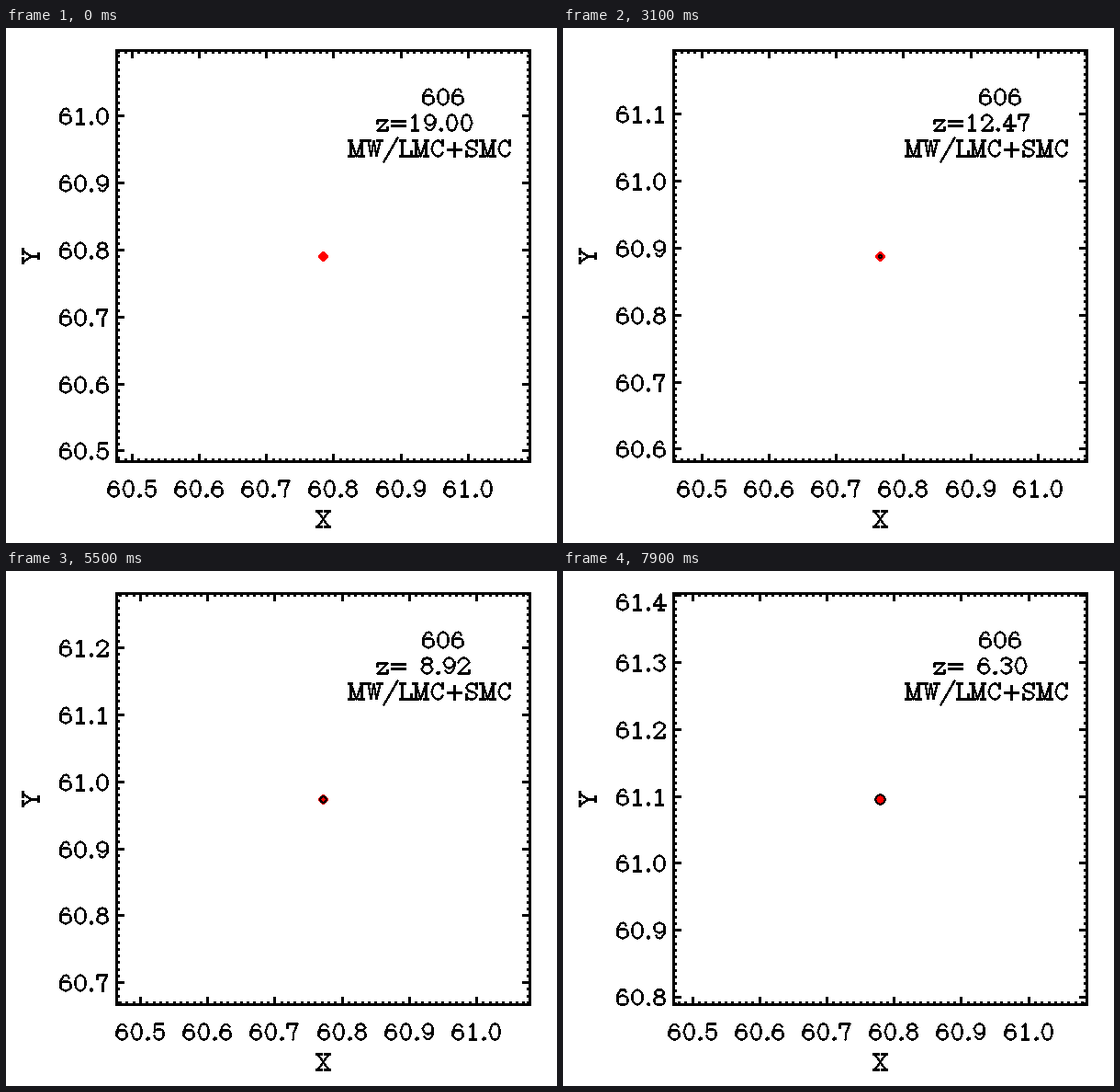
Animation of 600x560 px, one loop 8 s. Source, as a matplotlib script:

```python
import numpy as np
import matplotlib.pyplot as plt
from matplotlib.animation import FuncAnimation
from matplotlib.collections import LineCollection
from matplotlib.patches import Polygon

W, H, DPI = 600, 560, 100
FRAMES, INTERVAL = 80, 100
PX = 72 / DPI                                 # one pixel in points
LEFT, RIGHT, TOP, BOTTOM = 120.5, 570.5, 24.5, 471.5
CX, CY = 346, 248                             # middle of the plot
SX, SY = 732, 728                             # pixels per data unit
SCALE = 0.8                                   # pixels per glyph unit

# ---- stroke font: y grows upward from the baseline, capitals are 21 high ----
FONT = {" ": (16, [])}


def line(*xy):
    return np.array(xy, float).reshape(-1, 2)


def bowl(cy, ry, a0=0, a1=360, rx=7, cx=10):
    a = np.radians(np.linspace(a0, a1, max(4, int(abs(a1 - a0) / 20) + 1)))
    return np.column_stack([cx + rx * np.cos(a), cy + ry * np.sin(a)])


def serif(y, *xs, half=3):
    return [line(x - half, y, x + half, y) for x in xs]


def glyph(char, width, *strokes):
    FONT[char] = (width, list(strokes))


glyph("0", 20, bowl(10.5, 10.5))
glyph("1", 20, line(6, 17, 10, 21, 10, 0), *serif(0, 10, half=4))
glyph("2", 20, bowl(15.5, 5.5, 180, -40), line(15.4, 12, 3, 0, 17, 0, 17, 4))
glyph("3", 20, bowl(16.5, 4.5, 160, -90), bowl(6, 6, 90, -160))
glyph("4", 20, line(12, 0, 12, 21, 2, 6, 18, 6), *serif(0, 12))
glyph("5", 20, line(15, 21, 5, 21, 3.9, 10.5), bowl(7, 7, 150, -160))
glyph("6", 20, bowl(6.5, 6.5), bowl(10, 11, 45, 180), line(3, 10, 3, 6.5))
glyph("7", 20, line(3, 16, 3, 21, 17, 21, 11, 10, 10, 0))
glyph("8", 20, bowl(16.5, 4.5, rx=6), bowl(6, 6))
glyph("9", 20, *[np.array([20, 21]) - s for s in FONT["6"][1]])
glyph(".", 10, bowl(1, 1, rx=1, cx=5))
glyph("=", 26, *serif(12, 13, half=9), *serif(6, 13, half=9))
glyph("+", 26, line(13, 18, 13, 0), *serif(9, 13, half=9))
glyph("/", 22, line(20, 25, 2, -7))
glyph("M", 24, line(5, 0, 5, 21, 12, 0, 19, 21, 19, 0),
      *serif(0, 5, 19), *serif(21, 4, 20, half=2))
glyph("W", 24, line(4, 21, 8, 0, 12, 21, 16, 0, 20, 21), *serif(21, 4, 20))
glyph("L", 18, line(5, 21, 5, 0), line(2, 0, 17, 0, 17, 6), *serif(21, 5))
glyph("C", 21, bowl(10.5, 10.5, 35, 325, rx=8, cx=11), line(18, 21, 18, 15))
glyph("S", 20, bowl(15.8, 5.2, 30, 270), bowl(5.3, 5.3, 90, -150),
      line(17, 21, 17, 15), line(3, 6, 3, 0))
glyph("X", 20, line(3, 21, 17, 0), line(17, 21, 3, 0),
      *serif(21, 4, 16), *serif(0, 4, 16))
glyph("Y", 21, line(3, 21, 10.5, 10, 18, 21), line(10.5, 10, 10.5, 0),
      *serif(21, 4, 17), *serif(0, 10.5))
glyph("z", 18, line(2, 10, 2, 14, 16, 14, 2, 0, 16, 0, 16, 4))


def text(string, x, y, upright=False):
    """Strokes of a string whose baseline starts at pixel (x, y)."""
    out, pen = [], 0
    for char in string:
        width, shapes = FONT[char]
        for s in shapes:
            u, v = (s[:, 0] + pen) * SCALE, s[:, 1] * SCALE
            p = (x - v, y - u) if upright else (x + u, y - v)
            out.append(np.floor(np.column_stack(p)) + 0.5)
        pen += width
    return out


# ---- motion: the view follows a drifting point while z falls ----
STEPS = [0, 12, 21, 41, 55, 69, 79]
PATH_X = [60.7850, 60.7765, 60.7641, 60.7680, 60.7725, 60.7787, 60.7800]
PATH_Y = [60.7912, 60.8263, 60.8562, 60.9205, 60.9743, 61.0373, 61.0960]


def redshift(i):
    return 20 * np.exp(-0.01275 * i) - 1


def halo_radius(i):
    return 5.2 * (i / (FRAMES - 1)) ** 1.3


def marks(mid, centre, scale, lo, hi):
    """Pixel position, value and length of each tick between lo and hi."""
    first = int(np.ceil((mid + (lo - centre) / scale) * 100))
    last = int(np.floor((mid + (hi - centre) / scale) * 100))
    for k in range(first, last + 1):
        p = centre + (k / 100 - mid) * scale
        yield p, k / 100, 8.5 if k % 10 == 0 else 3.5


def axes_strokes(x, y):
    ticks, labels = [], []
    for p, value, n in marks(x, CX, SX, LEFT, RIGHT):
        p = np.floor(p) + 0.5
        ticks += [line(p, TOP, p, TOP + n), line(p, BOTTOM, p, BOTTOM - n)]
        if n > 5:
            labels += text(f"{value:.1f}", p - 28.2, 509.5)
    for p, value, n in marks(y, CY, SY, H - 64 - BOTTOM, H - 64 - TOP):
        p = np.floor(2 * CY - p) + 0.5
        ticks += [line(LEFT, p, LEFT + n, p), line(RIGHT, p, RIGHT - n, p)]
        if n > 5:
            labels += text(f"{value:.1f}", 57, np.clip(p + 9, TOP + 18, BOTTOM + 0.5))
    return ticks, labels


# ---- stage ----
fig = plt.figure(figsize=(W / DPI, H / DPI), dpi=DPI, facecolor="white")
ax = fig.add_axes([0, 0, 1, 1])
ax.set(xlim=(0, W), ylim=(H, 0))
ax.axis("off")


def strokes(segments, width, cap="projecting"):
    lines = LineCollection(segments, colors="black", linewidths=width * PX,
                           antialiaseds=False, capstyle=cap)
    lines.set_snap(False)
    return ax.add_collection(lines, autolim=False)


PEN = 1.1
strokes([line(LEFT, TOP, RIGHT, TOP, RIGHT, BOTTOM, LEFT, BOTTOM, LEFT, TOP)], 3)
strokes(text("606", 452, 83.5) + text("MW/LMC+SMC", 371.8, 139.5)
        + text("X", 337.5, 542.5) + text("Y", 35.5, 256.5, upright=True), PEN)
ticks = strokes([], 3, "butt")
labels = strokes([], PEN)

MX, MY, R = 345.5, 248.5, 5.3
ax.add_patch(Polygon([(MX - R, MY), (MX, MY - R), (MX + R, MY), (MX, MY + R)],
                     fc="red", ec="none", antialiased=False))
halo, = ax.plot([], [], color="black", lw=PX, antialiased=False)


def update(i):
    tick_lines, label_lines = axes_strokes(np.interp(i, STEPS, PATH_X),
                                           np.interp(i, STEPS, PATH_Y))
    ticks.set_segments(tick_lines)
    labels.set_segments(label_lines + text(f"z={redshift(i):5.2f}", 402.5, 111.5))
    r = halo_radius(i)
    halo.set_data(*bowl(MY, r, rx=r, cx=MX).T)
    halo.set_visible(r > 0.3)
    return ticks, labels, halo


anim = FuncAnimation(fig, update, frames=FRAMES, interval=INTERVAL,
                     repeat=True, repeat_delay=0, blit=False)
plt.show()
```
